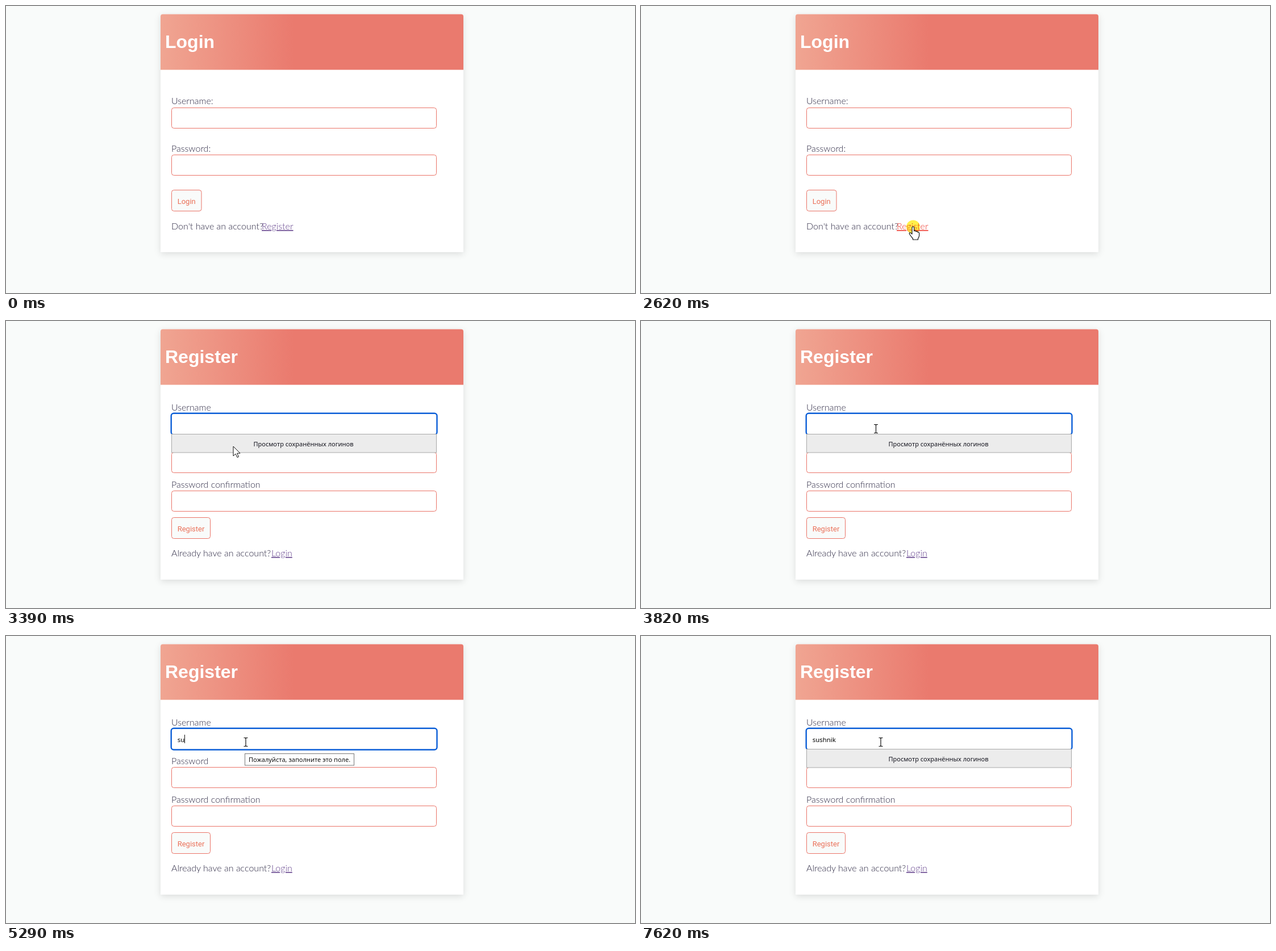
Recreate the animation shown at these times as an HTML page. Size 1107 px wide and 506 px high, loop 8 s.

```html
<!DOCTYPE html>
<html lang="en">
<head>
<meta charset="utf-8">
<title>Login and register</title>
<style>
  html, body { margin: 0; width: 100%; height: 100%; overflow: hidden; background: #f9fbfa; }
  svg { display: block; width: 1107px; height: 506px; }
  text { white-space: pre; }
  .card { fill: #fff; filter: drop-shadow(0 3px 6px rgba(0, 0, 0, .12)); }
  .title { font: bold 32px "Liberation Sans", sans-serif; fill: #fff; }
  .label, .link { font: 300 16px Lato, sans-serif; fill: #2d2944; }
  .link { fill: #63418c; text-decoration: underline; }
  .link.active { fill: #ee3a30; }
  .field { fill: #fff; stroke: #ea7468; }
  .button { fill: #f9fbfa; stroke: #ea7468; }
  .button-text { font: 13px Roboto, sans-serif; fill: #ea7058; }
  .ring { fill: #fff; stroke: #0b5ed7; stroke-width: 2.4; }
  .hint { font: 500 11px "Noto Sans", sans-serif; fill: #15151f; }
  .tip { font: 11px "Noto Sans", sans-serif; fill: #111; }
  .typed { font: 11.4px "Noto Sans", sans-serif; fill: #000; }
  .cursor { fill: #fff; stroke: #111; stroke-linejoin: round; }
</style>
</head>
<body>
<svg id="stage" viewBox="0 0 1107 506"></svg>
<script>
const LOOP = 8000;
const NAME = "sushnik";

const text = (cls, x, y, str, extra = "") =>
  `<text class="${cls}" x="${x}" y="${y}" ${extra}>${str}</text>`;
const box = (cls, x, y, w, h, r = 4, extra = "") =>
  `<rect class="${cls}" x="${x}" y="${y}" width="${w}" height="${h}" rx="${r}" ${extra}/>`;
const field = y => box("field", 291.5, y, 466, 36);
const button = (y, w, str) =>
  box("button", 291.5, y, w, 37) + text("button-text", 301.7, y + 24, str);

const card = (bottom, title) =>
  box("card", 272, 14.5, 533, bottom - 14.5) +
  `<path fill="#fff" d="M272 ${bottom - 10}h533v10h-533z"/>` +
  `<path fill="url(#head)" d="M272 112.5V18.5q0-4 4-4h525q4 0 4 4v94z"/>` +
  text("title", 280, 74, title);

const loginPage = card(434, "Login") +
  text("label", 291, 173, "Username:") + field(179.5) +
  text("label", 291, 257, "Password:") + field(262.5) +
  button(324.5, 52.5, "Login") +
  text("label", 291, 394, "Don't have an account?") +
  text("link", 450, 394, "Register", 'id="link"');

const registerPage = card(456, "Register") +
  text("label", 291, 158, "Username") + field(163.5) +
  box("ring", 290.7, 162.7, 467.8, 37.8, 4.5, 'id="ring"') +
  text("label", 291, 226, "Password") + field(231.5) +
  text("label", 291, 294, "Password confirmation") + field(299.5) +
  button(346.5, 68, "Register") +
  text("label", 291, 415, "Already have an account?") +
  text("link", 467, 415, "Login") +
  text("typed", 301.7, 186.5, "", 'id="typed"') +
  '<path id="caret" stroke="#111" d="M0 174v15"/>' +
  '<g id="hint">' +
    box("", 291.5, 199.5, 466, 32.5, 0, 'fill="#ececec" stroke="#a8a8a8"') +
    text("hint", 523.5, 221, "Просмотр сохранённых логинов", 'text-anchor="middle"') +
  '</g><g id="tip">' +
    box("", 420.5, 207.5, 192, 20.5, 0, 'fill="#fff" stroke="#777"') +
    text("tip", 427, 222, "Пожалуйста, заполните это поле.") +
  "</g>";

const $ = id => document.getElementById(id);
$("stage").innerHTML = `
  <defs><linearGradient id="head">
    <stop stop-color="#f0a592"/><stop offset=".44" stop-color="#ea7a6e"/>
  </linearGradient></defs>
  <rect width="1107" height="506" fill="#f9fbfa"/>
  <g id="login">${loginPage}</g>
  <g id="register">${registerPage}</g>
  <circle id="click" cx="479" cy="389.5" r="12" fill="#fff04a" style="mix-blend-mode:multiply"/>
  <g id="cursor" class="cursor">
    <path id="arrow" d="M0 0V17L4 13.2L7 19.5L9.5 18.4L6.7 12.2H12Z"/>
    <path id="hand" stroke-width="1.2" d="M-2 2Q-2 0-.2 0Q1.6 0 1.6 2V8Q1.8 7 3.3 7.2Q5 7.4 5 9
      Q5.4 8 6.8 8.3Q8 8.6 8 10Q8.6 9.3 9.6 9.7Q10.6 10.2 10.6 11.5V16Q10.4 18.5 8.5 21V23H-.5V21
      Q-3 18.5-6.5 13Q-7.3 11.2-6 10.6Q-4.5 10.2-2 13Z"/>
    <path id="beam" fill="none" stroke-width="1.2"
      d="M-3.5-7.5H-1L0-6.5L1-7.5H3.5M-3.5 7.5H-1L0 6.5L1 7.5H3.5M0-6.5V6.5"/>
  </g>`;

// Pointer keys: time, x, y
const toLink = [[330, 1034, 488], [470, 880, 415], [610, 680, 350], [750, 540, 328],
  [890, 466, 350], [960, 476, 376], [1100, 481, 386], [1230, 480, 388], [1300, 479, 389]];
const toField = [[2830, 479, 390], [2960, 476, 380], [3170, 436, 295], [3380, 400, 221],
  [3590, 403, 195], [3800, 413.5, 190], [4160, 422, 187]];
// Typing: time, characters shown
const typing = [[5220, 1], [5290, 2], [5440, 3], [7090, 4], [7290, 5], [7420, 6], [7490, 7]];
const caretFlips = [2760, 3290, 3890, 4360, 4890, 5950, 6490, 7020, 7090, 7620];

function along(keys, t) {
  const next = keys.findIndex(k => k[0] > t);
  if (next === 0) return keys[0].slice(1);
  if (next < 0) return keys[keys.length - 1].slice(1);
  const [t0, x0, y0] = keys[next - 1], [t1, x1, y1] = keys[next];
  const p = (t - t0) / (t1 - t0);
  return [x0 + (x1 - x0) * p, y0 + (y1 - y0) * p];
}

const stepped = (t, start) => start + Math.floor((t - start) / 70) * 70;
const show = (id, on) => $(id).setAttribute("display", on ? "inline" : "none");
const within = (v, a, b) => v >= a && v < b;

function draw(t) {
  const second = t >= 2690;
  show("login", !second);
  show("register", second);
  $("link").classList.toggle("active", within(t, 2620, 2690));
  show("click", within(t, 2620, 2760));
  show("ring", t >= 2760);
  show("hint", within(t, 2830, 3890) || t >= 5440);
  show("tip", within(t, 4760, 5440));

  const count = typing.filter(k => k[0] <= t).length;
  $("typed").textContent = NAME.slice(0, count);
  show("caret", caretFlips.filter(f => f <= t).length % 2 === 1);
  const end = count ? $("typed").getComputedTextLength() : 0;
  $("caret").setAttribute("transform", `translate(${Math.round(301.7 + end) + .5})`);

  const [x, y] = second ? along(toField, stepped(t, 2960)) : along(toLink, stepped(t, 330));
  const hand = within(t, 1030, 2690);
  const beam = second && (y < 200 || within(y, 232, 268) || within(y, 300, 336));
  show("cursor", t >= 330);
  show("hand", hand);
  show("beam", beam);
  show("arrow", !hand && !beam);
  $("cursor").setAttribute("transform", `translate(${x} ${y})`);
}

const start = performance.now();
function tick() {
  draw((performance.now() - start) % LOOP);
  requestAnimationFrame(tick);
}
tick();
</script>
</body>
</html>
```
